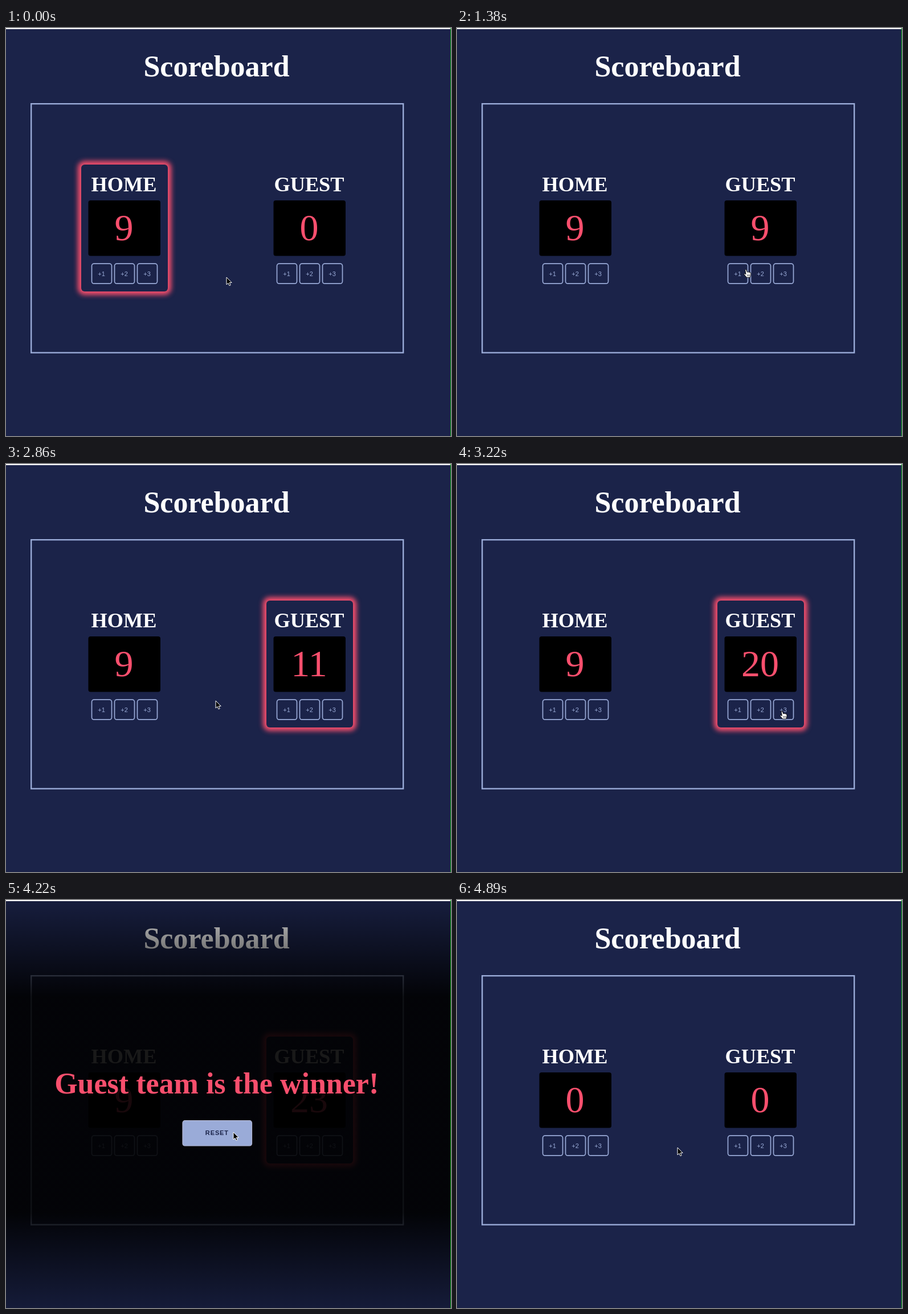
Animation of 781x717 px, one loop 5100 ms. Source, as an HTML page:

```html
<!DOCTYPE html>
<html lang="en">
<head>
<meta charset="utf-8">
<title>Scoreboard</title>
<style>
  html, body { margin: 0; width: 100%; height: 100%; overflow: hidden; background: #1b2349; }
  #stage { position: relative; width: 781px; height: 717px; overflow: hidden; }
  #stage > * { position: absolute; box-sizing: border-box; }
  svg { left: 0; top: 0; }
  text { text-anchor: middle; fill: #fff; font-family: "Liberation Serif", serif; }
  .head { font-weight: bold; }
  .score { font-size: 66px; fill: #f94f6d; }
  .button { fill: none; stroke: #9aabd8; stroke-width: 1.7; }
  .label { font: 11px "Liberation Sans", sans-serif; fill: #9aabd8; }
  .glow { top: 240px; width: 152px; height: 223px; border-radius: 6px; box-shadow: 0 0 9px 6px #f94f6d; }
  #shade { inset: 0; background: linear-gradient(rgba(0,0,0,.15), rgba(0,0,0,.9) 170px, rgba(0,0,0,.9) 550px, rgba(0,0,0,.22)); }
  #reset text { font: bold 11px "Liberation Sans", sans-serif; letter-spacing: .9px; }
</style>
</head>
<body>
<div id="stage">
  <div class="glow" id="homeGlow" style="left:132px"></div>
  <div class="glow" id="guestGlow" style="left:457px"></div>
  <svg width="781" height="717">
    <text class="head" x="369.5" y="85" font-size="52">Scoreboard</text>
    <rect x="44.2" y="133.2" width="653" height="437.4" fill="none" stroke="#9aabd8" stroke-width="2.4"/>
    <g id="teams"></g>
  </svg>
  <div id="shade"></div>
  <svg width="781" height="717">
    <g id="winner">
      <text class="head" x="369.7" y="340" font-size="52" style="fill:#f94f6d">Guest team is the winner!</text>
      <g id="reset">
        <rect x="310" y="387.7" width="121.5" height="44.3" rx="4" stroke="#b4b8d4" stroke-width="1.2"/>
        <text x="370.4" y="413">RESET</text>
      </g>
    </g>
    <rect width="781" height="2" fill="#fff"/>
    <rect x="780" width="1" height="717" fill="#18b020"/>
    <g id="cursor" stroke-linejoin="round">
      <path id="arrow" d="M0 0V13L3 10.3L5 14.8L7.2 13.8L5.2 9.5H9.2Z" fill="#000" stroke="#fff"/>
      <path id="hand" d="M-1 1Q0 -1 1.2 1L2.7 5Q4 3.7 5 5Q6.3 4 7.2 5.5Q8.8 5 9 7V10L7.6 14H1.5L-3 8.5Q-3 6.8 -1 7.7L.3 8.5Z" fill="#fff" stroke="#000" stroke-width=".9"/>
      <path id="fingers" d="M3 9V12M5 9V12M7 9V12" stroke="#000" stroke-width=".7"/>
    </g>
  </svg>
</div>
<script>
const LOOP = 5100, WIN = 3350, RESET = 4320;
const $ = id => document.getElementById(id);

const team = (name, id, x) => `
  <text class="head" x="${x}" y="286.5" font-size="36.3">${name}</text>
  <rect x="${x - 62.5}" y="303" width="126.5" height="97.5" rx="4"/>
  <text class="score" id="${id}" x="${x}" y="373"></text>` +
  [1, 2, 3].map(n => {
    const left = x - 97.5 + n * 40;
    return `<rect class="button" x="${left + 1}" y="414.2" width="35" height="35" rx="4"/>
      <text class="label" x="${left + 18}" y="435.5">+${n}</text>`;
  }).join("");
$("teams").innerHTML = team("HOME", "home", 207) + team("GUEST", "guest", 532);

// [time, guest score]
const scores = [[0, 0], [140, 3], [890, 6], [1000, 9], [1430, 10], [1620, 11],
  [2970, 14], [3050, 17], [3220, 20], [WIN, 23], [RESET, 0]];

// [time, x, y]
const path = [[0, 387, 438], [30, 387, 438], [140, 580, 435], [1190, 580, 435],
  [1400, 505, 424], [1920, 505, 424], [2130, 368, 416], [2860, 368, 416],
  [2970, 570, 434], [3220, 570, 434], [WIN, 570, 433], [3650, 570, 433],
  [4110, 399, 408], [4510, 399, 408], [4890, 387, 435], [LOOP, 387, 435]];

function cursorAt(t) {
  const i = path.findIndex(p => p[0] > t);
  const [t0, x0, y0] = path[i - 1], [t1, x1, y1] = path[i];
  const u = (t - t0) / (t1 - t0), e = u * u * (3 - 2 * u);
  return [x0 + (x1 - x0) * e, y0 + (y1 - y0) * e];
}

const show = (id, on) => $(id).style.display = on ? "" : "none";

function draw(now) {
  const t = now % LOOP;
  const won = t >= WIN && t < RESET;
  const home = t < RESET ? 9 : 0;
  const guest = scores.findLast(s => s[0] <= t)[1];
  const [x, y] = cursorAt(t);

  $("home").textContent = home;
  $("guest").textContent = guest;
  show("homeGlow", home > guest);
  show("guestGlow", guest > home);
  show("shade", won);
  show("winner", won);

  const hover = won && x > 310 && x < 432 && y > 387 && y < 433;
  $("reset").children[0].style.fill = hover ? "#9aabd8" : "#030309";
  $("reset").children[1].style.fill = hover ? "#1b244a" : "#fff";

  const pointing = !won && x > 475 && x < 591 && (x - 475) % 40 < 36 && y > 413 && y < 450;
  show("arrow", !pointing);
  show("hand", pointing);
  show("fingers", pointing);
  $("cursor").setAttribute("transform", `translate(${x} ${y})`);
}

const start = performance.now();
function tick() {
  draw(performance.now() - start);
  requestAnimationFrame(tick);
}
tick();
</script>
</body>
</html>
```
